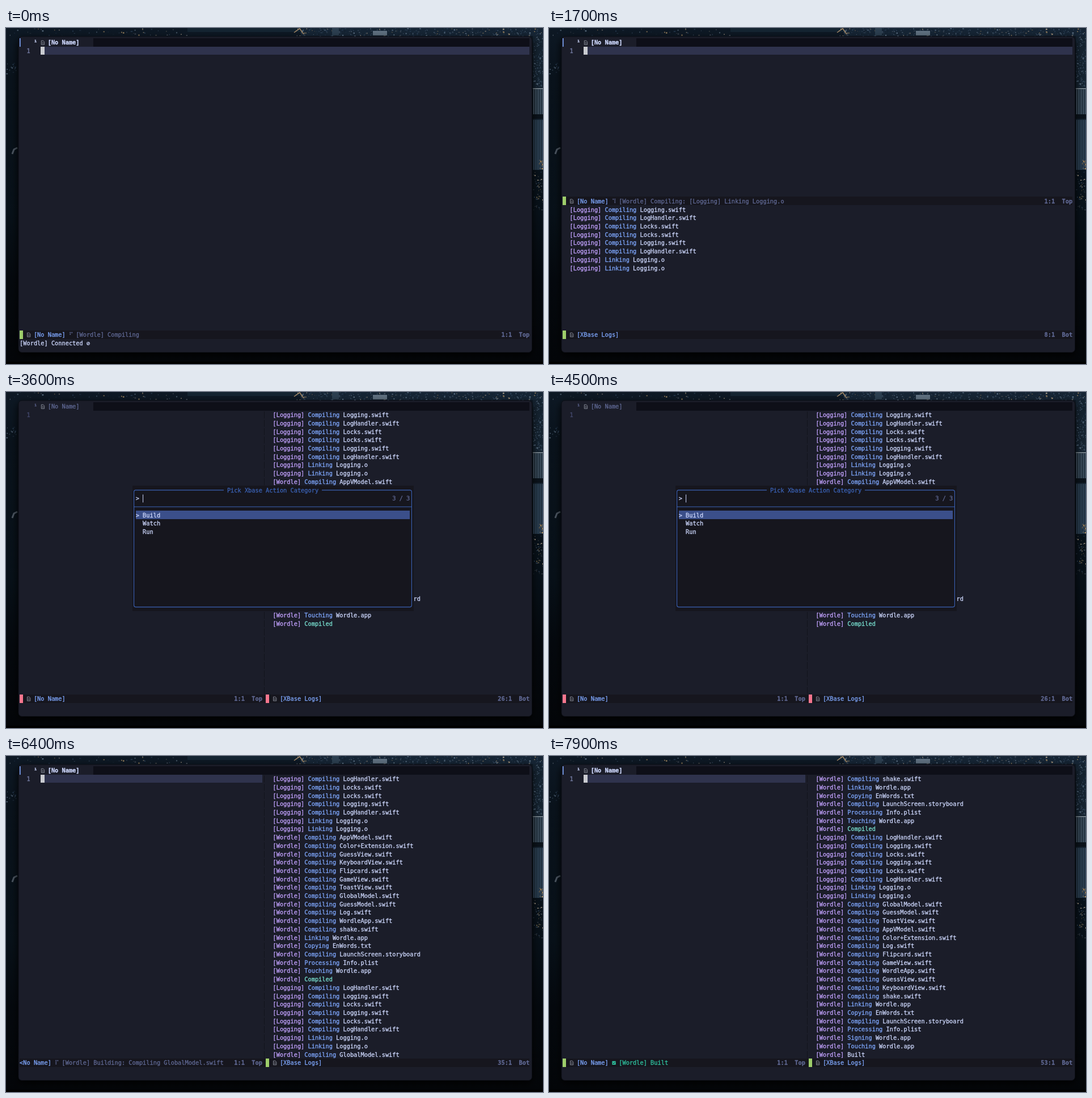
An HTML page with a canvas that plays this animation: 947x592 px, repeating every 8120 ms.

```html
<!DOCTYPE html>
<html lang="en">
<head>
<meta charset="utf-8">
<title>Build log</title>
<style>
  html, body { margin: 0; width: 100%; height: 100%; overflow: hidden; background: #05090f; }
  canvas { display: block; }
</style>
</head>
<body>
<canvas id="stage" width="947" height="592"></canvas>
<script>
const LOOP = 8120, WIDTH = 947, HEIGHT = 592;
const CELL = 6.2, ROW = 14.71, LEFT = 24.1, TOP = 25.8;   // TOP is the middle of row 0
const COLS = 145, HALF = 69, STATUS_ROW = 35;
const FONT = '10.3px "DejaVu Sans Mono", monospace';
const C = {
  bg: '#1b1d29', bar: '#16161e', tabs: '#0e0f18', line: '#2f334d', fg: '#ccd6fb', blue: '#7ea6fb',
  purple: '#c0a0fb', dim: '#5f6893', green: '#9ece6a', red: '#f7768e', mint: '#78e0d0',
  teal: '#2fc3a0', border: '#3b62b5', pick: '#3b4f8a', cursor: '#c9cbd0', icon: '#8d919d'
};

const compile = (project, names) =>
  names.split(' ').map(name => [project, 'Compiling', name + '.swift']);
const linkLogging = ['Logging', 'Linking', 'Logging.o'];
const app = verb => ['Wordle', verb, 'Wordle.app'];
const resources = [
  app('Linking'), ['Wordle', 'Copying', 'EnWords.txt'],
  ['Wordle', 'Compiling', 'LaunchScreen.storyboard'], ['Wordle', 'Processing', 'Info.plist']
];
const log = [
  ...compile('Logging', 'Logging LogHandler Locks Locks Logging LogHandler'), linkLogging, linkLogging,
  ...compile('Wordle', 'AppVModel Color+Extension GuessView KeyboardView Flipcard GameView ' +
    'ToastView GlobalModel GuessModel Log WordleApp shake'),
  ...resources, app('Touching'), ['Wordle', 'Compiled', ''],
  ...compile('Logging', 'LogHandler Logging Locks Logging Locks LogHandler'), linkLogging, linkLogging,
  ...compile('Wordle', 'GlobalModel GuessModel ToastView AppVModel Color+Extension Log Flipcard ' +
    'GameView WordleApp GuessView KeyboardView shake'),
  ...resources, app('Signing'), app('Touching'), ['Wordle', 'Built', '']
];

// Time in ms, number of log lines; linear in between.
const progress = [[0, 0], [1199, 0], [1200, 1], [1300, 1], [2600, 24], [2800, 26],
                  [5500, 26], [6400, 35], [7400, 53], [LOOP, 53]];
const SPLIT = 1200, VERTICAL = 2000, COMPILED = 2800, PICKER = 3400, PICKED = 4800, BUILD = 5000, BUILT = 7500;

const ctx = document.getElementById('stage').getContext('2d');
let pen = ctx;

const x = col => LEFT + col * CELL;
const y = row => TOP + row * ROW;

function rect(color, left, top, width, height) {
  pen.fillStyle = color;
  pen.fillRect(left, top, width, height);
}

// Fills whole character cells, snapped to pixels.
function cells(color, col, row, count, rows = 1) {
  const left = Math.round(x(col)), top = Math.floor(y(row - 0.5));
  rect(color, left, top, Math.round(x(col + count)) - left, Math.floor(y(row + rows - 0.5)) - top);
}

// A hairline outline gives the text its slightly heavy weight.
function text(string, col, row, color, weight = '') {
  pen.font = weight + ' ' + FONT;
  pen.fillStyle = pen.strokeStyle = color;
  pen.lineWidth = 0.3;
  pen.lineJoin = 'round';
  pen.fillText(string, x(col), y(row) + 3.6);
  pen.strokeText(string, x(col), y(row) + 3.6);
}

function stroke(color, width, ...points) {
  pen.strokeStyle = color;
  pen.lineWidth = width;
  pen.beginPath();
  points.forEach(([px, py]) => pen.lineTo(px, py));
  pen.stroke();
}

function fileIcon(col, row) {
  const left = x(col) + 1, top = y(row) - 3.5;
  stroke(C.icon, 0.9, [left, top], [left + 3.5, top], [left + 5.3, top + 2], [left + 5.3, top + 7], [left, top + 7], [left, top]);
  for (const dy of [3, 5]) stroke(C.icon, 0.8, [left + 1.2, top + dy], [left + 4, top + dy]);
}

function checkIcon(col, row) {
  const left = x(col) + 0.5, top = y(row) - 3;
  rect(C.teal, left, top, 6.3, 6.3);
  stroke(C.bar, 1, [left + 1.3, top + 3], [left + 2.7, top + 4.5], [left + 5, top + 1.8]);
}

function makeWallpaper() {
  const canvas = document.createElement('canvas');
  canvas.width = WIDTH;
  canvas.height = HEIGHT;
  pen = canvas.getContext('2d');
  let seed = 7;
  const random = () => (seed = seed * 16807 % 2147483647) / 2147483647;
  const lights = (count, left, top, width, height, colors) => {
    for (let i = 0; i < count; i++) {
      pen.globalAlpha = 0.25 + random() * 0.65;
      rect(colors[Math.floor(random() * colors.length)], left + random() * width, top + random() * height,
        0.7 + random() * 2, 0.7 + random() * 1.6);
    }
    pen.globalAlpha = 1;
  };
  const sky = pen.createLinearGradient(0, 0, 0, HEIGHT);
  [[0, '#0d1824'], [0.15, '#09121b'], [0.55, '#071018'], [0.75, '#04080d'], [1, '#030508']]
    .forEach(stop => sky.addColorStop(...stop));
  rect(sky, 0, 0, WIDTH, HEIGHT);
  rect('#142431', 320, 0, 200, 7);
  const cool = ['#263a50', '#40566e', '#72879c', '#131f2b'], warm = ['#b49667', '#c7b49a', '#6f7680'];
  lights(60, 0, 0, 320, 13, [...cool, ...warm]);
  rect('#152434', 520, 0, 427, 14);
  lights(330, 520, 0, 427, 14, cool);
  lights(60, 510, 0, 437, 14, warm);
  rect('#5f7080', 647, 5, 25, 8);
  rect('#2b3e4f', 575, 0, 12, 13);
  stroke('#a88b68', 1.5, [508, 8], [518, 1], [525, 11]);
  rect('#14222f', 929, 14, 18, 91);
  lights(170, 929, 14, 18, 90, cool);
  rect('#14222f', 929, 105, 18, 145);
  for (let px = 930; px < 947; px += 3) {
    rect('#66798a', px, 108, 1, 44);
    rect('#3b5268', px, 162, 1.4, 88);
  }
  rect('#8d99a2', 929, 106, 18, 1.5);
  rect('#0a121a', 929, 152, 18, 8);
  lights(18, 940, 232, 7, 18, ['#d39a50', '#e0b577']);
  lights(60, 929, 250, 18, 70, [...cool, ...warm]);
  lights(20, 0, 60, 18, 20, cool);
  stroke('#4c5661', 3, [11, 222], [14, 214], [20, 211]);
  rect('#000', 0, 588, WIDTH, 4);

  pen.shadowColor = '#000';
  pen.shadowBlur = 14;
  pen.shadowOffsetY = 5;
  pen.fillStyle = C.bg;
  pen.beginPath();
  pen.roundRect(22, 15, 905.5, 556.5, 6);
  pen.fill();
  pen.shadowColor = 'transparent';
  pen.strokeStyle = '#0d0f16';
  pen.lineWidth = 1;
  pen.stroke();
  pen = ctx;
  return canvas;
}

function lineCount(time) {
  const next = progress.findIndex(([at]) => at > time);
  const [t0, n0] = progress[next - 1], [t1, n1] = progress[next];
  return Math.floor(n0 + (n1 - n0) * (time - t0) / (t1 - t0) + 1e-6);
}

// Task shown in the status line: marker, message and colour.
function task(time, count) {
  const building = time >= BUILD;
  if (time >= BUILT) return { done: true, message: '[Wordle] Built', color: C.teal };
  if (time >= COMPILED && !building) {
    return time < PICKER ? { done: true, message: '[Wordle] Compiled', color: C.teal } : null;
  }
  let message = '[Wordle] ' + (building ? 'Building' : 'Compiling');
  if (count > (building ? 26 : 0)) {
    const [project, verb, file] = log[count - 1];
    message += ': ' + (project === 'Logging' ? '[Logging] ' : '') + verb + ' ' + file;
  }
  const spinStart = building ? BUILD + 35 : 100;
  const step = Math.floor(Math.max(0, time - spinStart) / 71);
  return { spinner: '⠋⠙⠹⠸⠼⠴⠦⠧⠇⠏'[step % 10], message: message.trimEnd(), color: C.dim };
}

function statusLine(col, row, width, name, position, place, modeColor, job) {
  cells(C.bar, col, row, width);
  const jobCol = 4 + name.length + 1;
  const length = job ? jobCol + 2 + job.message.length : jobCol;
  const cut = Math.max(0, length - (width - 11));
  const put = (string, at, color) => {
    const hidden = Math.max(0, cut + (cut ? 1 : 0) - at);
    text(string.slice(hidden), col + at + hidden - cut, row, color);
  };
  if (!cut) cells(modeColor, col, row, 1);
  if (cut < 2) fileIcon(col + 2 - cut, row);
  put(name, 4, C.blue);
  if (cut) text('<', col, row, C.blue);
  if (job) {
    if (job.done) checkIcon(col + jobCol - cut, row);
    else put(job.spinner, jobCol, C.dim);
    put(job.message, jobCol + 2, job.color);
  }
  text(position, col + width - 5 - position.length, row, C.dim, 'bold');
  text(place, col + width - 3, row, C.dim, 'bold');
}

function logLines(col, row, rows, count) {
  log.slice(Math.max(0, count - rows), count).forEach(([project, verb, file], i) => {
    const verbCol = col + project.length + 3;
    const color = verb === 'Compiled' ? C.mint : verb === 'Built' ? C.fg : C.blue;
    text(`[${project}]`, col, row + i, C.purple);
    text(verb, verbCol, row + i, color);
    text(file, verbCol + verb.length + 1, row + i, C.fg);
  });
}

function picker() {
  const left = x(32.5), right = x(111.5), top = y(10), bottom = y(24);
  cells(C.bar, 32, 10, 80, 15);
  pen.strokeStyle = C.border;
  pen.lineWidth = 1.1;
  pen.beginPath();
  pen.roundRect(left, top, right - left, bottom - top, 3);
  pen.stroke();
  stroke(C.border, 1.1, [left, y(12)], [right, y(12)]);
  cells(C.bar, 58, 10, 28);
  text('Pick Xbase Action Category', 59, 10, C.border);
  text('>', 33, 11, C.fg);
  rect(C.fg, x(35), y(11) - 7, 1, 14);
  text('3 / 3', 106, 11, C.dim);
  cells(C.pick, 33, 13, 78);
  text('>', 33, 13, C.fg);
  ['Build', 'Watch', 'Run'].forEach((label, i) => text(label, 35, 13 + i, C.fg));
}

const wallpaper = makeWallpaper();

function draw(now) {
  const time = Math.floor(now % LOOP / 100) * 100;
  const count = lineCount(time);
  const picking = time >= PICKER && time < PICKED;
  const split = time >= SPLIT, vertical = time >= VERTICAL;
  const mainWidth = vertical ? HALF : COLS;
  const mode = picking ? C.red : C.green;
  ctx.drawImage(wallpaper, 0, 0);

  cells(C.tabs, 21, 0, COLS - 21);
  if (!picking) rect(C.blue, 24, 18, 1.6, 15);
  text('¹', 4, 0, picking ? C.dim : C.fg, picking ? '' : 'bold');
  fileIcon(6, 0);
  text('[No Name]', 8, 0, picking ? C.dim : C.fg, picking ? '' : 'bold');
  text('1', 2, 1, picking ? '#454b70' : '#7a82ab');
  if (!picking) {
    cells(C.line, 6, 1, mainWidth - 6);
    cells(C.cursor, 6, 1, 1);
  }

  const mainRow = split && !vertical ? 19 : STATUS_ROW;
  statusLine(0, mainRow, mainWidth, '[No Name]', '1:1', 'Top', mode, task(time, count));
  if (split) {
    const col = vertical ? HALF + 1 : 0, row = vertical ? 1 : 20;
    logLines(col + 2, row, STATUS_ROW - row, count);
    statusLine(col, STATUS_ROW, COLS - col, '[XBase Logs]', count + ':1', count > 1 ? 'Bot' : 'Top', mode);
    if (vertical) {
      cells(C.bar, HALF, STATUS_ROW, 1);
      for (let r = 1; r < STATUS_ROW; r++) rect('#12131b', x(HALF + 0.5), y(r) - 6, 1, 12);
    }
  } else {
    text('[Wordle] Connected ⊘', 0, 36, C.fg);
  }
  if (picking) picker();
}

const start = performance.now();
function tick() {
  draw(performance.now() - start);
  requestAnimationFrame(tick);
}
tick();
</script>
</body>
</html>
```
